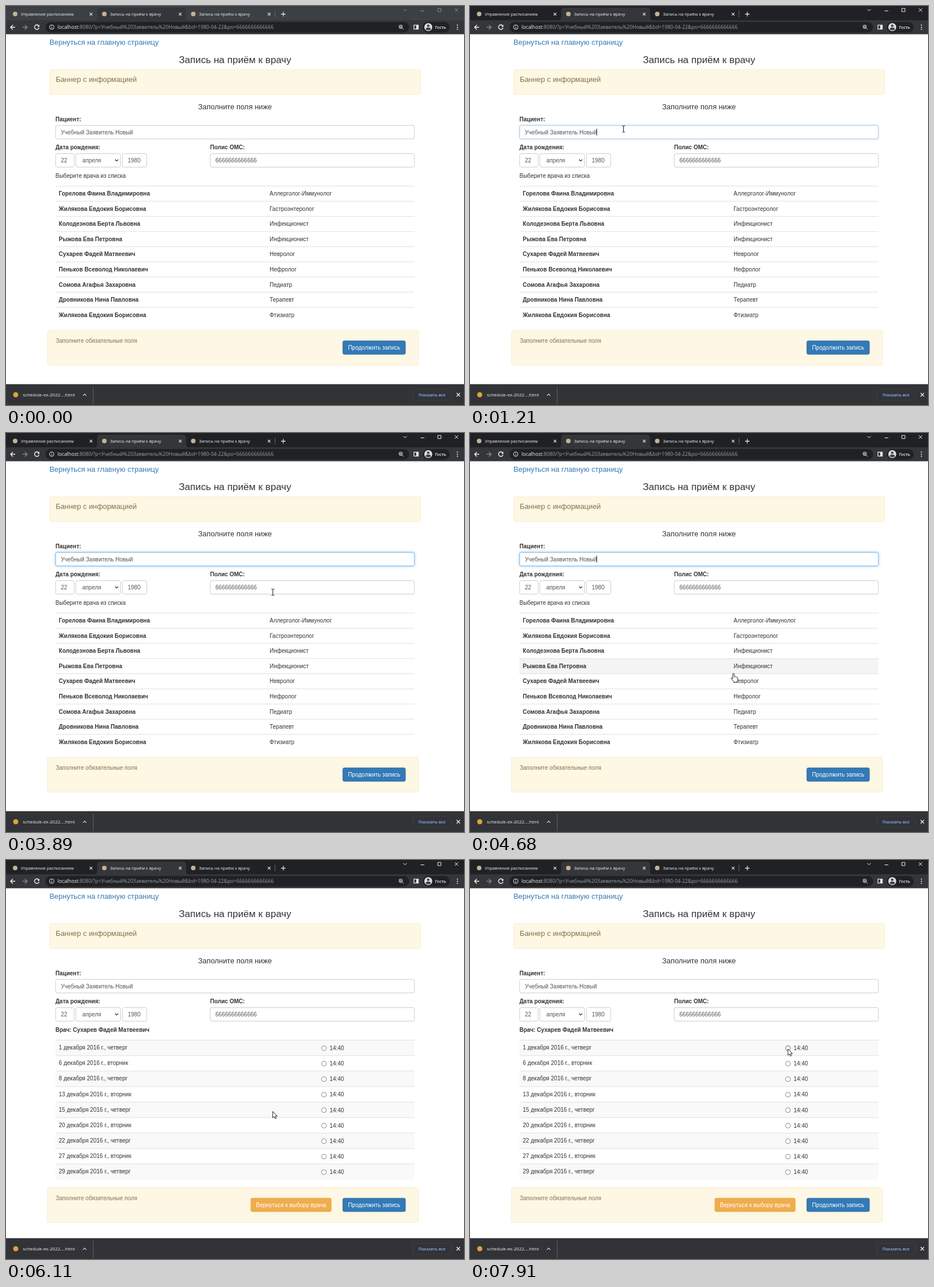
An HTML page that plays this animation: 801 by 699 pixels, repeating every 8000 ms.

```html
<!DOCTYPE html>
<html lang="ru">
<head>
<meta charset="utf-8">
<title>Запись на приём к врачу</title>
<style>
html, body { margin: 0; width: 100%; height: 100%; overflow: hidden; background: #fff; }
svg { display: block; font-family: "Liberation Sans", Arial, sans-serif; }
text { white-space: pre; }
.ui { font-family: "Open Sans", "Noto Sans", sans-serif; }
.focus { filter: drop-shadow(0 0 2.6px rgba(102, 175, 233, .6)); }
</style>
</head>
<body>
<svg id="stage" width="801" height="699" viewBox="0 0 801 699"></svg>
<script>
const LOOP = 8000;
const BODY = 10, MID = 12.86, BIG = 17.14;
const stage = document.getElementById('stage');

function add(parent, tag, attrs, content) {
  const node = document.createElementNS('http://www.w3.org/2000/svg', tag);
  for (const key in attrs) node.setAttribute(key, attrs[key]);
  if (content !== undefined) node.textContent = content;
  parent.appendChild(node);
  return node;
}
const group = () => add(stage, 'g', {});
const rect = (p, x, y, width, height, fill, more) =>
  add(p, 'rect', { x, y, width, height, fill, ...more });
const text = (p, x, y, str, size = BODY, fill = '#333', more) =>
  add(p, 'text', { x, y, 'font-size': size, fill, ...more }, str);
const bold = (p, x, y, str) => text(p, x, y, str, BODY, '#333', { 'font-weight': 700 });
const path = (p, d, stroke, width = 1, more) =>
  add(p, 'path', { d, stroke, 'stroke-width': width, fill: 'none', ...more });
const dot = (p, cx, cy, r, fill, more) => add(p, 'circle', { cx, cy, r, fill, ...more });
const centred = { 'text-anchor': 'middle' };
const ui = { class: 'ui' };
const cross = (p, x, y, r, color, width) =>
  path(p, `M${x - r} ${y - r}l${2 * r} ${2 * r}m0 ${-2 * r}l${-2 * r} ${2 * r}`, color, width);
const show = (node, on) => node.setAttribute('visibility', on ? 'visible' : 'hidden');

// ---- Browser window ----
const frame = group();
const strip = rect(frame, 0, 0, 801, 26, '#202124');
path(frame, 'M155 25.5Q159.5 25 159.5 20V8Q159.5 3 164.5 3H310Q315 3 315 8V20Q315 25 320 25.5Z', 'none', 0, { fill: '#35363a' });
rect(frame, 0, 25, 801, 24.5, '#35363a');
[['Управление расписанием', 11], ['Запись на приём к врачу', 167], ['Запись на приём к врачу', 322.5]].forEach(([title, x]) => {
  dot(frame, x + 5, 14, 4, '#c4b198');
  text(frame, x + 15, 17, title, 7.3, '#f1f3f4', ui);
  cross(frame, x + 137.7, 14.2, 2.4, '#e8eaed', 1.1);
});
path(frame, 'M470.5 8V20', '#5f6368');
path(frame, 'M481 14.3h8m-4-4v8', '#f1f3f4', 1.2);
const controls = group();
path(controls, 'M695 5.5l3 3 3-3M725 8.5h6.5M755.2 4.2h5.6v5.6h-5.6z', 'currentColor', 1);
cross(controls, 787.8, 7, 3, 'currentColor', 1);

const arrow = (x, s, color) => path(frame, `M${x - 4 * s} 37.2h${8 * s}M${x} 33.2l${-4 * s} 4 ${4 * s} 4`, color, 1.4);
arrow(12, 1, '#f1f3f4');
arrow(33, -1, '#85888c');
path(frame, 'M57.3 34.8A4 4 0 1 0 57.8 38.3', '#f1f3f4', 1.4);
path(frame, 'M58.4 32.8v3.7h-3.7z', 'none', 0, { fill: '#f1f3f4' });
rect(frame, 69, 28, 636, 18.5, '#202124', { rx: 9.2 });
path(frame, 'M80 36.4v3.2M80 34.2v1.2', '#dadce0', 1);
dot(frame, 80, 37, 4, 'none', { stroke: '#dadce0', 'stroke-width': 1 });
const url = text(frame, 90, 40.2, '', 8.77, '#9aa0a6', ui);
add(url, 'tspan', { fill: '#f1f3f4' }, 'localhost');
add(url, 'tspan', {}, ':8080/?p=Учебный%20Заявитель%20Новый&bd=1980-04-22&po=6666666666666');
dot(frame, 690.3, 36.3, 2.8, 'none', { stroke: '#dadce0', 'stroke-width': 1.1 });
path(frame, 'M692.4 38.4l3 3M689 36.3h2.6m-1.3-1.3v2.6', '#dadce0', 1);
rect(frame, 713.5, 33.5, 7.5, 7, 'none', { stroke: '#f1f3f4', 'stroke-width': 1.2 });
rect(frame, 717.5, 33.5, 3.5, 7, '#f1f3f4');
rect(frame, 729, 28, 47, 18.5, '#202124', { rx: 9.2 });
dot(frame, 738.5, 37, 7, '#dadce0');
dot(frame, 738.5, 34.6, 2.2, '#3c4043');
path(frame, 'M734 41q0-3.2 4.5-3.2t4.5 3.2q-4.5 3-9 0z', 'none', 0, { fill: '#3c4043' });
text(frame, 750.5, 39.7, 'Гость', 7.1, '#f1f3f4', { ...ui, 'font-weight': 600 });
[33.6, 37.2, 40.8].forEach(y => dot(frame, 789.5, y, 1, '#f1f3f4'));

rect(frame, 0, 662.5, 801, 37, '#323337');
dot(frame, 17, 681, 4.5, '#dda33c');
text(frame, 29.5, 684.3, 'schedule-ex-2022....html', 8, '#f1f3f4', ui);
path(frame, 'M134.5 682.8l3-3 3 3', '#dadce0', 1.1);
path(frame, 'M152.5 667V697', '#5f6368');
rect(frame, 711.5, 671.5, 67, 19.5, 'none', { rx: 2.5, stroke: '#3d3f43' });
text(frame, 745, 683.8, 'Показать все', 7.1, '#8ab4f8', { ...ui, ...centred, 'font-weight': 600 });
cross(frame, 791, 681, 3, '#f1f3f4', 1.2);

// ---- Page ----
const page = group();
const NOTE = '#85714a';
const alertBox = (p, x, y, h) => rect(p, x, y, 649, h, '#fdf7e3', { rx: 3, stroke: '#faebcc', 'stroke-width': .8 });
const field = (x, y, w, stroke = '#ccc') => rect(page, x, y, w, 23.7, '#fff', { rx: 2.8, stroke, 'stroke-width': 1 });
function button(p, x, y, w, label, fill, stroke) {
  rect(p, x, y, w, 23.6, fill, { rx: 2.8, stroke, 'stroke-width': .8 });
  text(p, x + w / 2, y + 15.7, label, BODY, '#fff', centred);
}
function footer(p, y) {
  alertBox(p, 72.4, y, 61.2);
  text(p, 87, y + 22, 'Заполните обязательные поля', BODY, NOTE);
  button(p, 589, y + 18.6, 109.6, 'Продолжить запись', '#337ab7', '#2e6da4');
}

text(page, 76, 67.5, 'Вернуться на главную страницу', MID, '#337ab7');
text(page, 400.5, 100.3, 'Запись на приём к врачу', BIG, '#333', centred);
alertBox(page, 76.4, 111.5, 43.8);
text(page, 87, 133.3, 'Баннер с информацией', MID, NOTE);
text(page, 400.5, 180.8, 'Заполните поля ниже', MID, '#333', centred);
bold(page, 86.5, 202, 'Пациент:');
field(86.8, 209.2, 627.4);
const glow = field(86.8, 209.2, 627.4, '#7dbbec');
glow.setAttribute('class', 'focus');
text(page, 96, 224.7, 'Учебный Заявитель Новый', BODY, '#555');
const caret = rect(page, 221.2, 215, 1, 12, '#222');
bold(page, 86.5, 250.8, 'Дата рождения:');
bold(page, 357, 250.8, 'Полис ОМС:');
[[86.8, 32.4, 96, '22'], [122.2, 78, 133.5, 'апреля'], [203.6, 42.4, 213, '1980'], [357.2, 357, 366.3, '6666666666666']].forEach(([x, w, tx, str]) => {
  field(x, 258.6, w);
  text(page, tx, 274.2, str, BODY, '#555');
});
path(page, 'M190.8 269l2.7 2.7 2.7-2.7', '#333', 1.3);

// ---- Doctor list ----
const TOP = 315.5, ROW = 26.55, SLOT = 27.15;
const rule = (p, y) => path(p, `M86.5 ${y}H714.5`, '#ddd', .9);
const doctors = group();
text(doctors, 86.5, 300.8, 'Выберите врача из списка');
const hover = rect(doctors, 86.5, TOP, 628, ROW, '#f4f4f4');
[
  ['Горелова Фаина Владимировна', 'Аллерголог-Иммунолог'],
  ['Жилякова Евдокия Борисовна', 'Гастроэнтеролог'],
  ['Колодезнова Берта Львовна', 'Инфекционист'],
  ['Рыжова Ева Петровна', 'Инфекционист'],
  ['Сухарев Фадей Матвеевич', 'Невролог'],
  ['Пеньков Всеволод Николаевич', 'Нефролог'],
  ['Сомова Агафья Захаровна', 'Педиатр'],
  ['Дровникова Нина Павловна', 'Терапевт'],
  ['Жилякова Евдокия Борисовна', 'Фтизиатр']
].forEach(([name, job], i) => {
  const y = TOP + i * ROW;
  rule(doctors, y);
  bold(doctors, 92.3, y + 16.7, name);
  text(doctors, 461, y + 16.7, job);
});
footer(doctors, 568);

// ---- Time slots ----
const slots = group();
bold(slots, 86.5, 300.8, 'Врач: Сухарев Фадей Матвеевич');
const radios = [1, 6, 8, 13, 15, 20, 22, 27, 29].map((day, i) => {
  const y = TOP + i * SLOT;
  if (i % 2 === 0) rect(slots, 86.5, y, 628, SLOT, '#f9f9f9');
  rule(slots, y);
  text(slots, 92.3, y + 16.6, `${day} декабря 2016 г., ${i % 2 ? 'вторник' : 'четверг'}`);
  text(slots, 566, y + 17.5, '14:40');
  return dot(slots, 556, y + 14.1, 4.1, '#fff', { stroke: '#767676', 'stroke-width': .9 });
});
footer(slots, 573.8);
button(slots, 428.2, 592.4, 140.6, 'Вернуться к выбору врача', '#f0ad4e', '#eea236');

// ---- Pointer ----
const click = dot(stage, 467, 440, 7, '#fbf03a', { opacity: .85, style: 'mix-blend-mode:multiply' });
const pointer = group();
const solid = { fill: '#fff', 'stroke-linejoin': 'round' };
const shapes = {
  arrow: path(pointer, 'M0 0V11.2L2.6 8.8 4.4 12.6 6.2 11.8 4.5 8.1H8z', '#111', .9, solid),
  beam: path(pointer, 'M-2.5 -5.5H-.8L0 -5 .8 -5.5H2.5M0 -5V5M-2.5 5.5H-.8L0 5 .8 5.5H2.5', '#111', 1),
  hand: path(pointer, 'M-1.3 9V.8a1.2 1.2 0 0 1 2.4 0V5.2l1.2-.4 1 .9 1.4-.2.8 1 1.3.2.6 1.2v3l-1.2 2.6v1.6h-6v-1.4L-4.4 8.8q-.6-1.5 1-1.3l2.1 1.6z', '#111', .9, solid)
};

// start, end, steps, target x, target y
const START = [594, 331];
const MOVES = [
  [320, 1100, 8, 268.5, 215.5],
  [1320, 2000, 7, 238, 270],
  [2670, 3120, 5, 467, 272.5],
  [3890, 4680, 8, 461, 421.5],
  [4790, 5020, 3, 466.5, 440.5],
  [6670, 7460, 8, 548, 343],
  [7570, 7910, 4, 556, 331]
];
const FOCUS = 1210, PRESS = 6000, SWITCH = 6110;
const CARET_FLIPS = [1770, 2230, 2780, 3350, 3890, 4430, 4960, 5460];

function pointerAt(t) {
  let [x, y] = START;
  for (const [from, to, n, tx, ty] of MOVES) {
    if (t < from) break;
    const k = Math.min(n, 1 + Math.floor((t - from + 5) / ((to - from) / (n - 1))));
    const p = k / n, e = p * p * (3 - 2 * p);
    x += (tx - x) * e;
    y += (ty - y) * e;
  }
  return [x, y];
}

function shapeAt(x, y, row, t) {
  if (t >= SWITCH) return 'arrow';
  if (row >= 0) return 'hand';
  const nameField = y > 209 && y < 233;
  const lowFields = y > 258 && y < 283 && (x > 357 || (x > 203 && x < 246));
  return nameField || lowFields ? 'beam' : 'arrow';
}

function focusAt(t) {
  if (t < FOCUS || t >= SWITCH) return 0;
  if (t >= PRESS) return .3;
  return t < FOCUS + 110 ? .4 : 1;
}

function draw(t) {
  const active = t >= FOCUS, booked = t >= SWITCH, inside = t >= 320;
  const [x, y] = pointerAt(t);
  const row = inside && !booked && y >= TOP ? Math.floor((y - TOP) / ROW) : -1;

  strip.setAttribute('fill', active ? '#202124' : '#3c4043');
  controls.setAttribute('color', active ? '#f1f3f4' : '#8b8e92');
  glow.setAttribute('opacity', focusAt(t));
  const flips = CARET_FLIPS.filter(f => t >= f).length;
  show(caret, active && t < PRESS && flips % 2 === 0);

  doctors.style.display = booked ? 'none' : '';
  slots.style.display = booked ? '' : 'none';
  show(hover, row >= 0);
  hover.setAttribute('y', TOP + Math.max(0, row) * ROW);
  radios[0].setAttribute('stroke', t >= 7910 ? '#4f4f4f' : '#767676');

  show(click, t >= PRESS && t < SWITCH);
  pointer.setAttribute('transform', `translate(${x.toFixed(2)} ${y.toFixed(2)})`);
  const shape = shapeAt(x, y, row, t);
  for (const key in shapes) show(shapes[key], inside && key === shape);
}

const began = performance.now();
function tick() {
  draw((performance.now() - began) % LOOP);
  requestAnimationFrame(tick);
}
tick();
</script>
</body>
</html>
```
